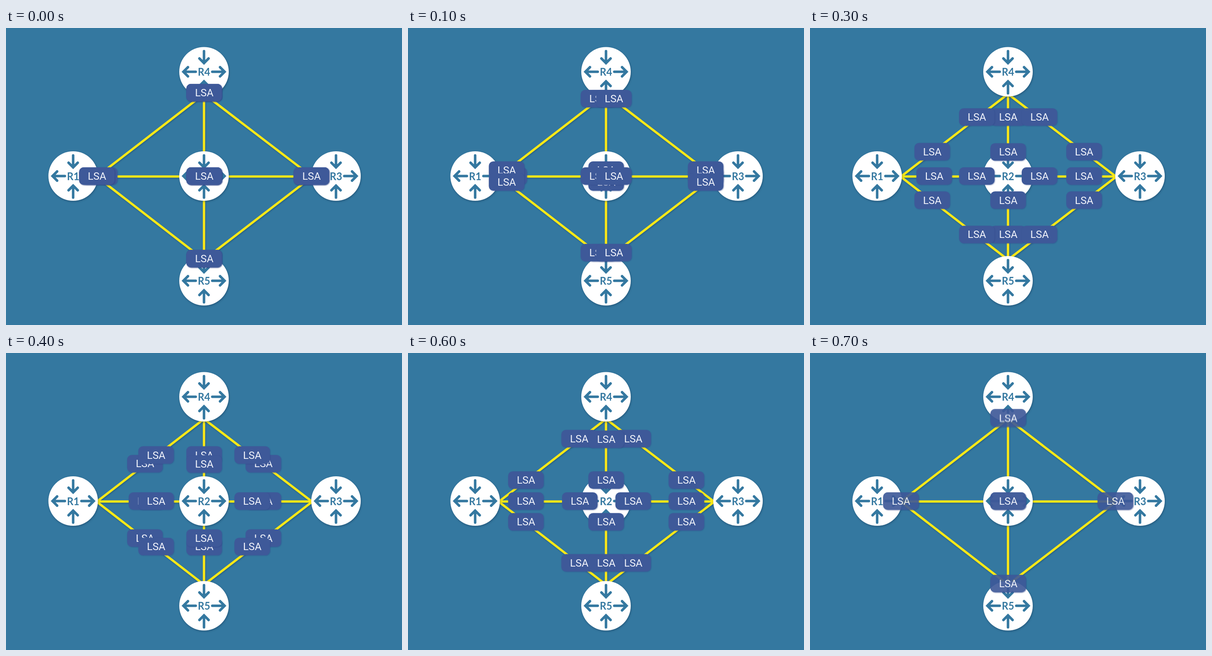
These frames come from a looping animation (864 by 648 pixels, 0.8 s). An HTML page:

```html
<!DOCTYPE html>
<html lang="en">
<head>
<meta charset="utf-8">
<title>Link state flooding</title>
<style>
  @property --p { syntax: "<number>"; inherits: true; initial-value: 0; }
  @property --fade { syntax: "<number>"; inherits: true; initial-value: 1; }

  html, body { margin: 0; width: 100%; height: 100%; overflow: hidden; background: #3478a0; }
  svg { display: block; width: 864px; height: 648px; }

  .links { stroke: #fce916; stroke-width: 5; fill: none; filter: drop-shadow(1px 2px 1.5px rgba(10, 40, 70, .3)); }
  .disc { fill: #fff; filter: drop-shadow(1px 2px 2px rgba(10, 40, 70, .4)); }
  .arrow { fill: none; stroke: #3478a0; stroke-width: 5.5; stroke-linecap: round; stroke-linejoin: miter; }
  text { text-anchor: middle; }
  .name { font: 700 22px Lato, "Open Sans", sans-serif; fill: #3478a0; }

  .packet {
    transform: translate(calc(var(--x) + var(--dx) * var(--p)), calc(var(--y) + var(--dy) * var(--p)));
    opacity: var(--fade);
    filter: drop-shadow(1.5px 1.5px 1.2px rgba(45, 70, 135, .5));
  }
  .packet rect { fill: #3e5999; }
  .packet text { font: 400 22.5px Roboto, "Liberation Sans", sans-serif; fill: #f4f6fc; }

  /* Eased crossing, held in 100 ms steps; packets fade on arrival */
  #packets { animation: flood 800ms step-end infinite; }
  @keyframes flood {
    0%    { --p: 0;    --fade: 1; }
    12.5% { --p: .072; --fade: 1; }
    25%   { --p: .169; --fade: 1; }
    37.5% { --p: .292; --fade: 1; }
    50%   { --p: .448; --fade: 1; }
    62.5% { --p: .603; --fade: 1; }
    75%   { --p: .748; --fade: 1; }
    87.5% { --p: 1;    --fade: .55; }
    100%  { --p: 0;    --fade: 1; }
  }
</style>
</head>
<body>
<svg viewBox="0 0 864 648">
  <g class="links">
    <path d="M198 324.5L432 144L668 324.5L432 505.5Z"/>
    <path d="M146 324H720M432 96V551"/>
  </g>
  <g id="routers"></g>
  <g id="packets"></g>
</svg>
<script>
  const routers = { R1: [146.5, 323], R2: [432, 323], R3: [720, 323], R4: [432, 95.5], R5: [432, 551.5] };
  const ports = { R1: [198, 323], R2: [432, 323], R3: [666, 323], R4: [432, 141], R5: [432, 503] };

  // Arrow along the x axis, its tip at `tip` and its tail at `tail`
  const arrow = (turn, tip, tail) => {
    const back = tip + Math.sign(tail - tip) * 10;
    return `<path class="arrow" transform="rotate(${turn})"
      d="M${tail} 0H${tip}M${back} -10L${tip} 0L${back} 10"/>`;
  };

  const router = ([name, [x, y]]) => `<g transform="translate(${x} ${y})">
    <circle class="disc" r="54"/>
    ${arrow(0, 45, 18)}${arrow(180, 45, 18)}${arrow(90, 21, 47)}${arrow(270, 19, 45)}
    <text class="name" y="8.5">${name}</text></g>`;

  const packet = ([x, y], [tx, ty]) => `<g class="packet"
    style="--x:${x}px;--y:${y}px;--dx:${tx - x}px;--dy:${ty - y}px">
    <rect x="-38.5" y="-19" width="77.5" height="38" rx="10"/>
    <text x=".5" y="8">LSA</text></g>`;

  const { R1, R2, R3, R4, R5 } = ports;
  const trips = [
    [[204, 323], R2], [R3, R2], [R4, R2], [R5, R2],
    [R1, R4], [R1, R5], [R3, R4], [R3, R5],
    [R4, R1], [R4, R3], [R5, R1], [R5, R3],
    [R2, [432, 143]], [R2, R5], [R2, R1], [R2, R3]
  ];

  document.getElementById("routers").innerHTML = Object.entries(routers).map(router).join("");
  document.getElementById("packets").innerHTML = trips.map(t => packet(...t)).join("");
</script>
</body>
</html>
```
